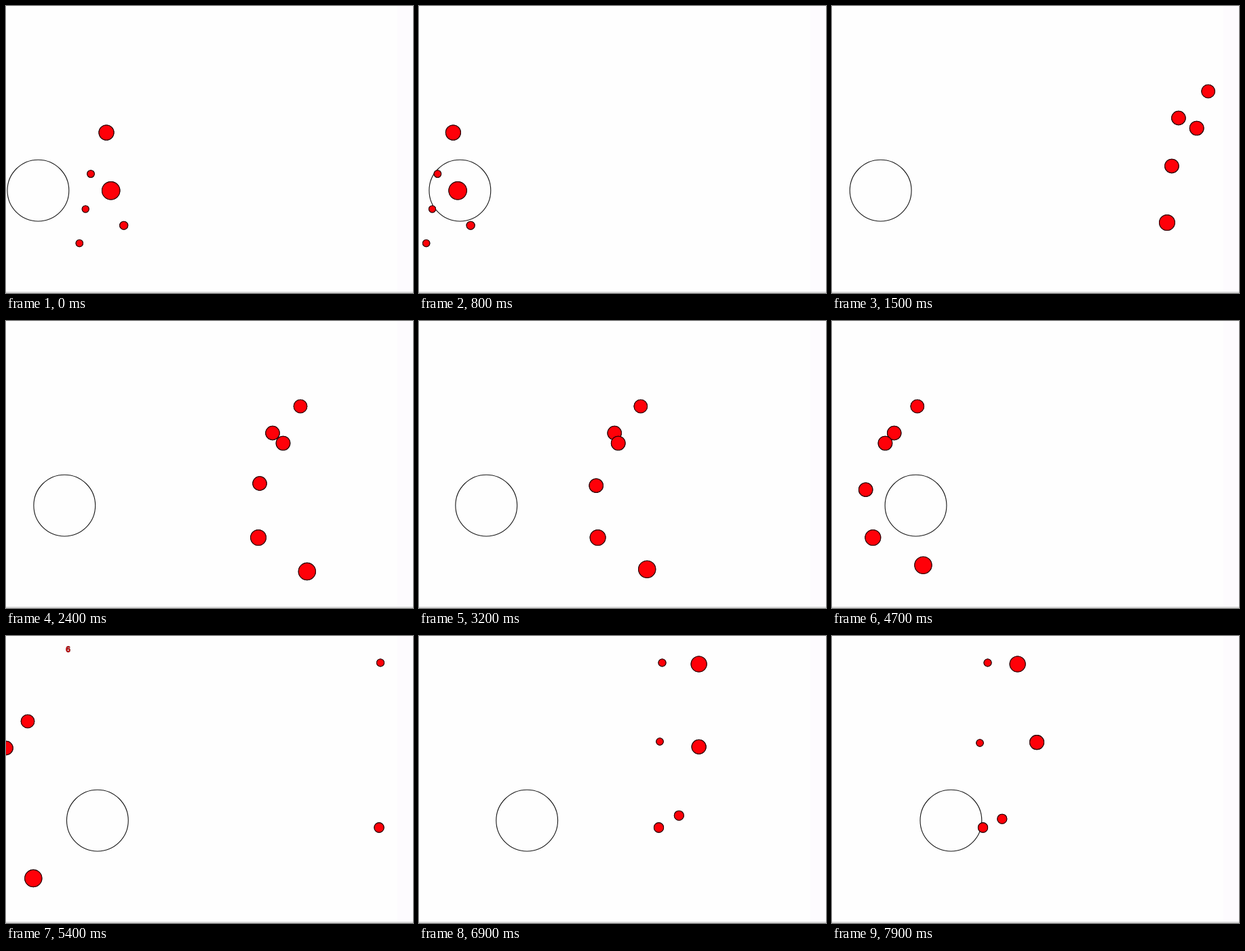
Animation of 600 by 424 pixels, one loop 8 s. Source, as an HTML page with a canvas:

```html
<!DOCTYPE html>
<html lang="en">
<head>
<meta charset="utf-8">
<title>Red balls</title>
<style>
html, body { margin: 0; width: 100%; height: 100%; overflow: hidden; background: #fefefe; }
canvas { display: block; }
</style>
</head>
<body>
<canvas id="stage" width="600" height="424"></canvas>
<script>
const ctx = document.getElementById('stage').getContext('2d');
const LOOP = 8000, STEP = 100, ENTRY_X = 560, RED = '#ff0008';

// Balls glide left at a steady speed and show up once past ENTRY_X.
// x and y hold at the wave's own time; speed and drift are px per second.
const ball = (x, y, r, speed = 122, drift = 0) => ({ x, y, r, speed, drift });
const waves = [
  { time: 0, balls: [
    ball(148, 187, 11), ball(125, 248, 5.3), ball(154.7, 272.8, 13.2),
    ball(117.2, 300, 5), ball(173.7, 324.2, 6), ball(108.3, 350.5, 5.2)
  ] },
  { time: 2400, balls: [
    ball(434, 126, 9.8, 134), ball(393, 165.5, 10.2, 131), ball(408.5, 180.5, 10.3, 143.5),
    ball(374, 240, 10.2, 141, 4), ball(372, 320, 11.4, 135.5), ball(443.8, 370, 12.6, 134.5, -4)
  ] },
  { time: 6900, balls: [
    ball(358.5, 39.5, 5.5, 129), ball(355, 156, 5.2, 137, 2), ball(353.5, 283, 7.1, 131),
    ball(383.3, 265.2, 7, 132.5, 5), ball(412.6, 41.5, 11.5, 139), ball(412.6, 163.8, 10.5, 110.6, -6.7)
  ] }
];

function circle(x, y, r) {
  ctx.beginPath();
  ctx.arc(x, y, r, 0, 2 * Math.PI);
  ctx.stroke();
}

function drawBackground() {
  ctx.fillStyle = '#fefefe';
  ctx.fillRect(0, 0, 600, 424);
  ctx.fillStyle = '#fdfbfe';
  ctx.fillRect(577, 0, 23, 422);
  ctx.fillStyle = '#b4b4b4';
  ctx.fillRect(0, 422.5, 600, 1);
}

function drawBalls(t) {
  ctx.strokeStyle = '#2a0006';
  ctx.fillStyle = RED;
  for (const { time, balls } of waves) {
    const s = (t - time) / 1000;
    for (const b of balls) {
      const x = b.x - b.speed * s;
      if (x > ENTRY_X || x < -b.r - 1) continue;
      circle(x, b.y + b.drift * s, b.r);
      ctx.fill();
      ctx.stroke();
    }
  }
}

function drawCount() {
  ctx.font = 'bold 12px "Liberation Sans", Arial, sans-serif';
  ctx.textAlign = 'center';
  ctx.fillStyle = RED;
  ctx.fillText('6', 91.7, 24);
  ctx.lineWidth = 0.6;
  ctx.strokeStyle = '#500';
  ctx.strokeText('6', 91.7, 24);
}

function draw(t) {
  drawBackground();
  ctx.lineWidth = 1.1;
  ctx.strokeStyle = '#181818';
  circle(47.4 + t * 0.0162, 272.6, 45.4);
  drawBalls(t);
  // The count flashes as each new wave enters.
  if ([1000, 5400].some(start => t >= start && t < start + 200)) drawCount();
}

function frame() {
  draw(Math.floor(performance.now() % LOOP / STEP) * STEP);
  requestAnimationFrame(frame);
}
frame();
</script>
</body>
</html>
```
